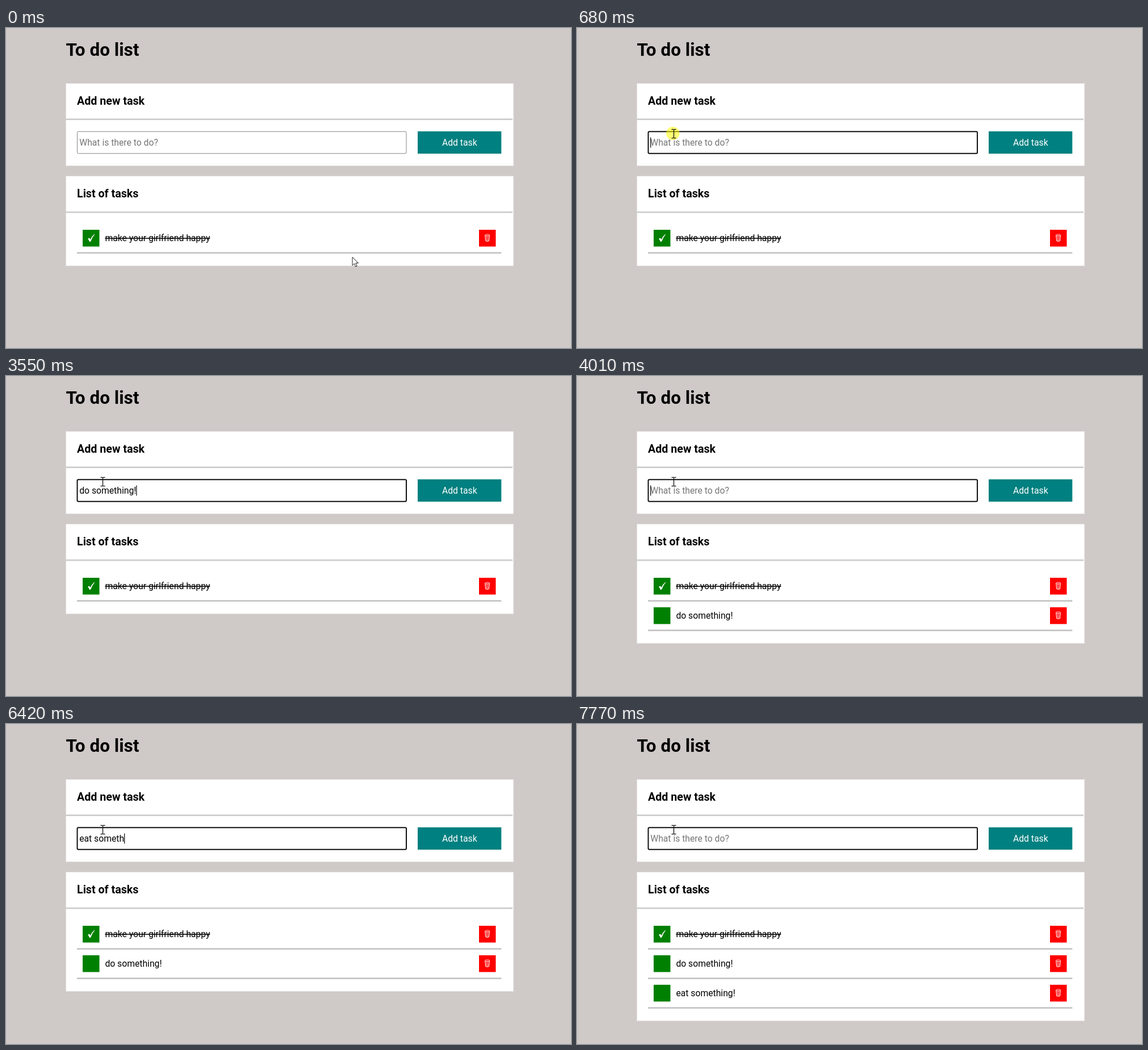
Write an HTML page that moves like this. It is 995 by 563 pixels and loops after 8 s.

```html
<!DOCTYPE html>
<html lang="en">
<head>
<meta charset="utf-8">
<title>To do list</title>
<style>
  html, body { margin: 0; width: 100%; height: 100%; overflow: hidden; background: #cfc9c8; }
  svg { display: block; width: 995px; height: 563px; }
  text { font: 15.73px Roboto, sans-serif; white-space: pre; }
  .title { font-size: 31.46px; font-weight: 700; }
  .heading { font-size: 19.66px; font-weight: 700; }
  .card { fill: #fff; stroke: #e2dedd; }
  .rule { fill: #ccc; }
  .done { text-decoration: line-through; }
</style>
</head>
<body>
<svg viewBox="0 0 995 563">
  <defs>
    <g id="row">
      <rect x="135" y="355" width="29.5" height="29.5" fill="#008000"/>
      <rect x="833" y="355" width="29.5" height="29.5" fill="#f00"/>
      <rect x="125" y="394.3" width="747.3" height="2.7" fill="#c4c4c4"/>
      <g fill="none" stroke="#fff" stroke-width=".9">
        <ellipse cx="847.6" cy="364.4" rx="4.1" ry="1.3"/>
        <path d="M843.5 364.6L844.6 374.6Q847.6 376.4 850.6 374.6L851.7 364.6"/>
        <path stroke-width=".8" opacity=".8" d="M845.4 366L846 375M847.6 366V375.4M849.8 366L849.2 375"/>
      </g>
    </g>
  </defs>

  <rect width="995" height="563" fill="#cfc9c8"/>
  <text class="title" x="105.6" y="49">To do list</text>

  <rect class="card" x="105.5" y="97.5" width="788.3" height="145"/>
  <rect class="rule" x="105.5" y="159.3" width="786.5" height="2.7"/>
  <text class="heading" x="125" y="135">Add new task</text>
  <rect id="field" x="125.5" y="182.2" width="579.5" height="38.6" rx="2" fill="#fff"/>
  <text id="entry" x="129.2" y="207"></text>
  <rect id="caret" y="192.5" width="1.2" height="18"/>
  <rect x="725" y="181.8" width="147.3" height="39.3" fill="#008080"/>
  <text x="798.8" y="207" fill="#fff" text-anchor="middle">Add task</text>

  <rect class="card" id="list" x="105.5" y="260.5" width="788.3"/>
  <rect class="rule" x="105.5" y="322.7" width="786.5" height="2.7"/>
  <text class="heading" x="125" y="298">List of tasks</text>

  <use href="#row"/>
  <path fill="#fff" d="M144 371Q145.8 369 146.9 369.5Q147.6 370 148.3 372.3Q151.2 366.2 155.4 362.7L156.2 363.1Q151.7 368.6 149.3 375.3Q147.5 376.4 146.9 375.9Q145.8 372 144 371Z"/>
  <text class="done" x="174.4" y="375">make your girlfriend happy</text>
  <g id="task1" transform="translate(0 51.9)"><use href="#row"/><text x="174.4" y="375">do something!</text></g>
  <g id="task2" transform="translate(0 103.8)"><use href="#row"/><text x="174.4" y="375">eat something!</text></g>

  <circle id="halo" cx="168.8" cy="185.5" r="11.7" fill="#ff0" opacity=".55"/>
  <path id="arrow" fill="#fff" stroke="#222" d="M.5 .5V15.2L3.9 12L6.2 17.4L8.6 16.4L6.3 11.1H11Z"/>
  <path id="beam" fill="none" stroke="#111" stroke-width="1.3" d="M-4 -7.6H-1L0 -7L1 -7.6H4M-4 7.6H-1L0 7L1 7.6H4M0 -7V7"/>
</svg>
<script>
const LOOP = 8000, TICK = 67, CLICK = 680, HALO_END = 810;
const BLINK = 530;
const HINT = "What is there to do?";
const entries = [
  { text: "do something!", submit: 4010,
    keys: [1490, 1630, 1740, 1810, 1950, 2160, 2300, 2680, 2890, 2940, 3130, 3270, 3550] },
  { text: "eat something!", submit: 7700,
    keys: [4780, 4980, 5180, 5380, 5440, 5620, 5810, 5870, 6090, 6420, 6480, 6750, 6880, 7150] }
];
// Intervals in which the caret is blinked off.
const caretOff = [[CLICK + BLINK, 1490], [4070, 4650], [7770, LOOP]];

const el = id => document.getElementById(id);
const show = (id, on) => el(id).setAttribute("visibility", on ? "visible" : "hidden");
const set = (id, attrs) => {
  for (const name in attrs) el(id).setAttribute(name, attrs[name]);
};

function typedAt(t) {
  const entry = entries.find(e => t >= e.keys[0] && t < e.submit);
  return entry ? entry.text.slice(0, entry.keys.filter(k => k <= t).length) : "";
}

function drawInput(t) {
  const focused = t >= CLICK;
  const typed = typedAt(t);
  const entry = el("entry");
  set("field", { stroke: focused ? "#101010" : "#858585", "stroke-width": focused ? 2 : 1 });
  entry.textContent = typed || HINT;
  entry.setAttribute("fill", typed ? "#000" : "#757575");
  const width = typed ? entry.getComputedTextLength() : 0;
  set("caret", { x: 129.1 + width });
  show("caret", focused && !caretOff.some(([from, to]) => t >= from && t < to));
}

function drawPointer(t) {
  const p = Math.min(1, Math.floor(t / TICK) / 9);
  const ease = (1 - Math.cos(Math.PI * p)) / 2;
  const x = 609.5 - 439 * ease, y = 402.5 - 216.5 * ease;
  const overField = y < 221 && x < 705;
  const transform = `translate(${x} ${y})`;
  set("arrow", { transform });
  set("beam", { transform });
  show("arrow", !overField);
  show("beam", overField);
  show("halo", t >= CLICK && t < HALO_END);
}

function drawList(t) {
  const added = entries.filter(e => t >= e.submit).length;
  set("list", { height: 158 + 51.9 * added });
  show("task1", added > 0);
  show("task2", added > 1);
}

function render(t) {
  drawInput(t);
  drawPointer(t);
  drawList(t);
}

function frame() {
  render(performance.now() % LOOP);
  requestAnimationFrame(frame);
}
frame();
</script>
</body>
</html>
```
